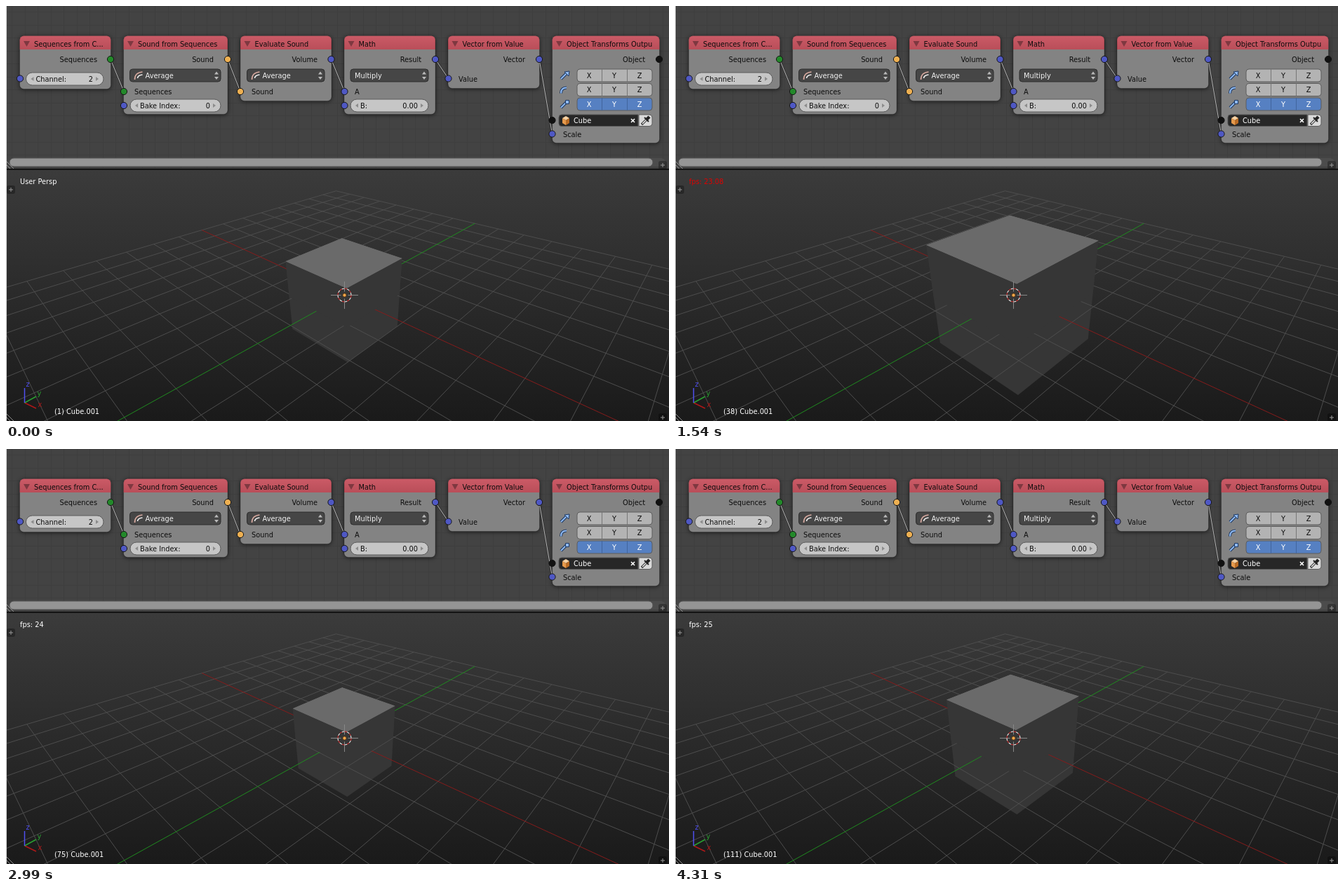
These frames come from a looping animation (945 px wide and 592 px high, 4370 ms). An HTML page with a canvas:

```html
<!DOCTYPE html>
<html lang="en">
<head>
<meta charset="utf-8">
<title>Sound driven cube</title>
<style>
html, body { margin: 0; width: 100%; height: 100%; overflow: hidden; background: #222; }
canvas { display: block; }
</style>
</head>
<body>
<canvas id="stage" width="945" height="592"></canvas>
<script>
const ctx = document.getElementById('stage').getContext('2d');
const LOOP = 4370, VIEW_TOP = 234, GRID = 0.0938, HALF = 8;

// Keys: [ms, value]
const SIZE = [[0, .104], [130, .1205], [270, .113], [530, .086], [800, .067], [1130, .063], [1400, .085],
  [1540, .15], [1600, .193], [1690, .2185], [1840, .1802], [2200, .078], [2480, .0637], [2830, .063],
  [3010, .1015], [3310, .071], [3680, .0632], [3870, .159], [3980, .152], [4310, .1173]];
const COUNT = [[0, 1], [530, 13], [1540, 38], [1840, 46], [2480, 63], [3680, 94], [4310, 111]];
const STATUS = [[0, 'User Persp'], [50, 'fps: 24'], [760, 'fps: 25'], [1130, 'fps: 24'], [1440, 'fps: 23.08'],
  [1690, 'fps: 24'], [2290, 'fps: 25'], [2700, 'fps: 23.61'], [2890, 'fps: 24'], [3560, 'fps: 23.45'], [3870, 'fps: 25']];

// Bursts of picture updates: [first ms, last ms, steps]
const BURSTS = [[50, 530, 10], [590, 1050, 9], [1130, 1600, 7], [1690, 2200, 8],
  [2290, 2770, 9], [2830, 3310, 9], [3410, 3930, 10], [3980, 4310, 7]];
const ticks = COUNT.map(k => k[0]);
for (const [a, b, n] of BURSTS)
  for (let i = 0; i < n; i++) ticks.push(Math.round(a + (b - a) * i / (n - 1)));

const linear = u => u;
const smooth = u => (1 - Math.cos(Math.PI * u)) / 2;
function sample(keys, t, ease) {
  const i = keys.findIndex(k => k[0] > t);
  if (i < 0) return keys[keys.length - 1][1];
  const [t0, a] = keys[i - 1], [t1, b] = keys[i];
  return a + (b - a) * ease((t - t0) / (t1 - t0));
}

function project([x, y, z = 0]) {
  const w = 1 - .603 * x + .6207 * y - .5032 * z;
  return [(482.5 + 102.5 * x + 662.3 * y - 250.6 * z) / w,
          (412.5 - 68.1 * x + 55.2 * y - 670.8 * z) / w + .5];
}

function trace(points) {
  ctx.beginPath();
  for (const p of points) ctx.lineTo(...p);
}
function line(points, color, width = 1) {
  trace(points);
  ctx.strokeStyle = color;
  ctx.lineWidth = width;
  ctx.stroke();
}
function poly(points, color) {
  trace(points);
  ctx.fillStyle = color;
  ctx.fill();
}
function box(x, y, x2, y2, r, fill, stroke) {
  ctx.beginPath();
  ctx.roundRect(x, y, x2 - x, y2 - y, r);
  ctx.fillStyle = fill;
  ctx.fill();
  if (!stroke) return;
  ctx.strokeStyle = stroke;
  ctx.lineWidth = 1;
  ctx.stroke();
}
function disc(x, y, r, fill, stroke) {
  ctx.beginPath();
  ctx.arc(x, y, r, 0, 2 * Math.PI);
  ctx.fillStyle = fill;
  ctx.fill();
  ctx.strokeStyle = stroke;
  ctx.lineWidth = 1;
  ctx.stroke();
}
function text(s, x, y, color = '#0c0c0c', align = 'left') {
  ctx.font = '9.8px "DejaVu Sans", sans-serif';
  ctx.textAlign = align;
  ctx.fillStyle = color;
  ctx.fillText(s, x, y + 3.6);
}

// Node editor
function node(x, x2, bottom, title) {
  ctx.save();
  ctx.shadowColor = 'rgba(0,0,0,.6)';
  ctx.shadowBlur = 6;
  ctx.shadowOffsetY = 1;
  box(x - .5, 42.5, x2 + .5, bottom + .5, 6, '#838383');
  ctx.restore();
  const red = ctx.createLinearGradient(0, 43, 0, 62);
  red.addColorStop(0, '#cb5a66');
  red.addColorStop(1, '#b94e59');
  box(x - .5, 42.5, x2 + .5, 62, [6, 6, 0, 0], red);
  box(x - .5, 42.5, x2 + .5, bottom + .5, 6, 'transparent', 'rgba(0,0,0,.25)');
  poly([[x + 5, 50], [x + 14, 50], [x + 9.5, 58]], '#7e3840');
  text(title, x + 20, 54);
}
function numberField(x, x2, y, label, value) {
  box(x, y - 9, x2, y + 9, 9, '#c6c6c6', '#5c5c5c');
  poly([[x + 11, y - 3], [x + 11, y + 3], [x + 7, y]], '#8c8c8c');
  poly([[x2 - 11, y - 3], [x2 - 11, y + 3], [x2 - 7, y]], '#8c8c8c');
  text(label, x + 14, y);
  text(value, x2 - 15, y, undefined, 'right');
}
function menu(x, x2, label, icon) {
  box(x, 90, x2, 108, 4, '#464646', '#2c2c2c');
  if (icon) {
    for (const d of [0, 4]) {
      ctx.beginPath();
      ctx.moveTo(x + 7 + d, 105 - d / 2);
      ctx.quadraticCurveTo(x + 7 + d, 95 + d, x + 18, 94 + d);
      ctx.strokeStyle = d ? '#eee' : '#d8aaa0';
      ctx.lineWidth = 1.7;
      ctx.stroke();
    }
  }
  text(label, x + (icon ? 22 : 6), 99.5, '#f2f2f2');
  const c = x2 - 6;
  poly([[c - 3, 97.5], [c + 3, 97.5], [c, 93.5]], '#bbb');
  poly([[c - 3, 101], [c + 3, 101], [c, 105]], '#bbb');
}
function link(a, b) {
  line([a, b], 'rgba(20,20,20,.35)', 2.5);
  line([a, b], '#b8b8b8', 1);
}
function plus(x, y) {
  box(x - 6, y - 6, x + 6, y + 6, 3, 'rgba(0,0,0,.3)');
  line([[x - 3, y], [x + 3, y]], '#999');
  line([[x, y - 3], [x, y + 3]], '#999');
}
function blueArrow(x, y, curved) {
  ctx.beginPath();
  ctx.moveTo(x - 5, y + 5);
  if (curved) ctx.quadraticCurveTo(x - 5, y - 3, x + 3, y - 3);
  else ctx.lineTo(x + 3, y - 3);
  ctx.strokeStyle = '#1b3763';
  ctx.lineWidth = 4;
  ctx.stroke();
  ctx.strokeStyle = '#8fb9f0';
  ctx.lineWidth = 2;
  ctx.stroke();
}

function transformRows() {
  [99, 119.5, 140].forEach((y, row) => {
    const on = row === 2;
    box(814, y - 9, 921, y + 9, 4, on ? '#5680c2' : '#b3b3b3', '#5c5c5c');
    for (const x of [849.5, 885.5]) line([[x, y - 9], [x, y + 9]], on ? '#41659d' : '#777');
    ['X', 'Y', 'Z'].forEach((s, i) => text(s, 831 + 36 * i, y, on ? '#fff' : undefined, 'center'));
    blueArrow(796, y, row === 1);
    if (row === 0) {
      const head = [[796, y - 5], [803, y - 6], [802, y + 1]];
      poly(head, '#8fb9f0');
      line([...head, head[0]], '#1b3763');
    }
    if (on) box(797.5, y - 5.5, 802.5, y - .5, 0, '#8fb9f0', '#1b3763');
  });
}
function objectField() {
  box(788, 155, 901, 171.5, [4, 0, 0, 4], '#272727', '#555');
  poly([[798, 157], [803, 160], [798, 163], [793, 160]], '#f7d2a4');
  poly([[793, 160], [798, 163], [798, 170], [793, 167]], '#e69a4c');
  poly([[803, 160], [798, 163], [798, 170], [803, 167]], '#b96b25');
  text('Cube', 809, 163.5, '#fff');
  line([[891, 161], [896, 166]], '#fff', 1.6);
  line([[896, 161], [891, 166]], '#fff', 1.6);
  box(902, 155, 921, 171.5, [0, 4, 4, 0], '#dadada', '#5c5c5c');
  line([[906, 169], [913, 162]], '#333', 3.4);
  line([[907, 168], [913, 162]], '#eee', 1.4);
  line([[910, 159], [916, 165]], '#222', 2);
  line([[913, 162], [917, 158]], '#222', 4.5);
}

function nodeEditor() {
  ctx.fillStyle = '#434343';
  ctx.fillRect(0, 0, 945, VIEW_TOP);
  for (let i = 0; i < 52; i++) {
    const p = Math.round(8 + i * 18.55) + .5;
    line([[p, 0], [p, 232]], '#3e3e3e');
    if (p < 232) line([[0, p], [945, p]], '#3e3e3e');
  }

  node(20, 149, 118, 'Sequences from C...');
  node(168, 315.5, 154, 'Sound from Sequences');
  node(334.5, 463.5, 135, 'Evaluate Sound');
  node(482.5, 611.5, 154, 'Math');
  node(630.5, 760, 117, 'Vector from Value');
  node(779, 931, 195, 'Object Transforms Outpu');

  for (const [s, x] of [['Sequences', 130], ['Sound', 296], ['Volume', 444], ['Result', 592], ['Vector', 740], ['Object', 911]])
    text(s, x, 76, undefined, 'right');
  for (const [s, x, y] of [['Sequences', 183, 122.5], ['Sound', 350, 122.5], ['A', 497, 122.5], ['Value', 645, 104], ['Scale', 794, 183]])
    text(s, x, y);

  numberField(28.5, 139, 104, 'Channel:', '2');
  numberField(177, 306, 142, 'Bake Index:', '0');
  numberField(491, 602, 142, 'B:', '0.00');
  menu(176.5, 306, 'Average', true);
  menu(343.5, 454, 'Average', true);
  menu(491, 602, 'Multiply');
  transformRows();
  objectField();

  const wires = [['#23892a', 149, 76, 168, 122], ['#eeb052', 316, 76, 334, 122], ['#4f58c4', 463.5, 76, 482.5, 122],
    ['#4f58c4', 612, 76, 630.5, 103.5], ['#4f58c4', 760, 76, 778.5, 182.5]];
  for (const [, x, y, x2, y2] of wires) link([x, y], [x2, y2]);
  for (const [c, x, y, x2, y2] of wires) {
    disc(x, y, 4.6, c, '#151515');
    disc(x2, y2, 4.6, c, '#151515');
  }
  for (const [x, y] of [[20, 103.5], [168, 142], [482.5, 142]]) disc(x, y, 4.6, '#4f58c4', '#151515');
  for (const [x, y] of [[778.5, 163], [931, 76]]) disc(x, y, 4.6, '#111', '#111');

  box(5, 217, 940, 229, 6, '#4c4c4c');
  box(5, 217, 922, 229, 6, '#959595', '#555');
  plus(936, 227);
}

// 3D view
function cube(s, bottom) {
  const ring = z => [[-1, -1], [1, -1], [1, 1], [-1, 1]].map(([x, y]) => project([x * s, y * s, z * s]));
  const top = ring(1);
  poly([...top.slice(0, 3), ...ring(bottom).slice(0, 3).reverse()], '#363636');
  poly(top, '#6a6a6a');
}
function floorGrid() {
  const end = HALF * GRID;
  for (let i = -HALF; i <= HALF; i++) {
    if (!i) continue;
    const p = i * GRID;
    line([project([p, -end]), project([p, end])], '#4d4d4d');
    line([project([-end, p]), project([end, p])], '#4d4d4d');
  }
  line([project([-end, 0]), project([end, 0])], '#851b1b');
  line([project([0, -end]), project([0, end])], '#1f8a1f');
}
function cursor(x, y) {
  for (const [dx, dy] of [[1, 0], [-1, 0], [0, 1], [0, -1]])
    line([[x + 5 * dx, y + 5 * dy], [x + 19.5 * dx, y + 19.5 * dy]], '#888');
  const n = 16;
  for (let i = 0; i < n; i++) {
    ctx.beginPath();
    ctx.arc(x, y, 9.5, 2 * Math.PI * i / n, 2 * Math.PI * (i + 1) / n);
    ctx.strokeStyle = i % 2 ? '#f0f0f0' : '#d33030';
    ctx.lineWidth = 1.1;
    ctx.stroke();
  }
  disc(x, y, 2.6, '#f5a74a', '#5a3a18');
}
function gizmo() {
  const axes = [['x', '#b01818', 43, 574, 48.5, 568.5], ['y', '#2ba032', 43, 557, 47.5, 552], ['z', '#5050f0', 26.5, 545, 31, 539]];
  for (const [name, color, x, y, tx, ty] of axes) {
    line([[26.5, 566], [x, y]], color, 1.5);
    text(name, tx, ty, color, 'center');
  }
}

function view(t) {
  ctx.save();
  ctx.beginPath();
  ctx.rect(0, VIEW_TOP, 945, 592 - VIEW_TOP);
  ctx.clip();
  const sky = ctx.createLinearGradient(0, VIEW_TOP, 0, 592);
  sky.addColorStop(0, '#3b3b3b');
  sky.addColorStop(1, '#1a1a1a');
  ctx.fillStyle = sky;
  ctx.fillRect(0, VIEW_TOP, 945, 592 - VIEW_TOP);

  // The floor passes through the middle of the cube: only the upper half hides it
  const s = sample(SIZE, t, smooth);
  cube(s, -1);
  floorGrid();
  cube(s, 0);
  cursor(482.5, 412.5);
  gizmo();

  const status = STATUS.filter(k => k[0] <= t).pop()[1];
  text(status, 20, 250.5, status.includes('.') ? '#e00000' : '#fff');
  text(`(${Math.round(sample(COUNT, t, linear))}) Cube.001`, 69, 578.5, '#fff');
  plus(7, 262);
  plus(936, 587);
  ctx.restore();
}

function frame(now) {
  const time = now % LOOP;
  const t = Math.max(...ticks.filter(k => k <= time));
  nodeEditor();
  view(t);
  ctx.fillStyle = '#141414';
  ctx.fillRect(0, 232, 945, 2);
  ctx.fillStyle = '#ddd';
  ctx.fillRect(0, 0, 1, 592);
  for (const y of [232, 592])
    for (const d of [5, 10]) line([[1, y - d], [1 + d, y]], '#aaa', .8);
  requestAnimationFrame(frame);
}
requestAnimationFrame(frame);
</script>
</body>
</html>
```
